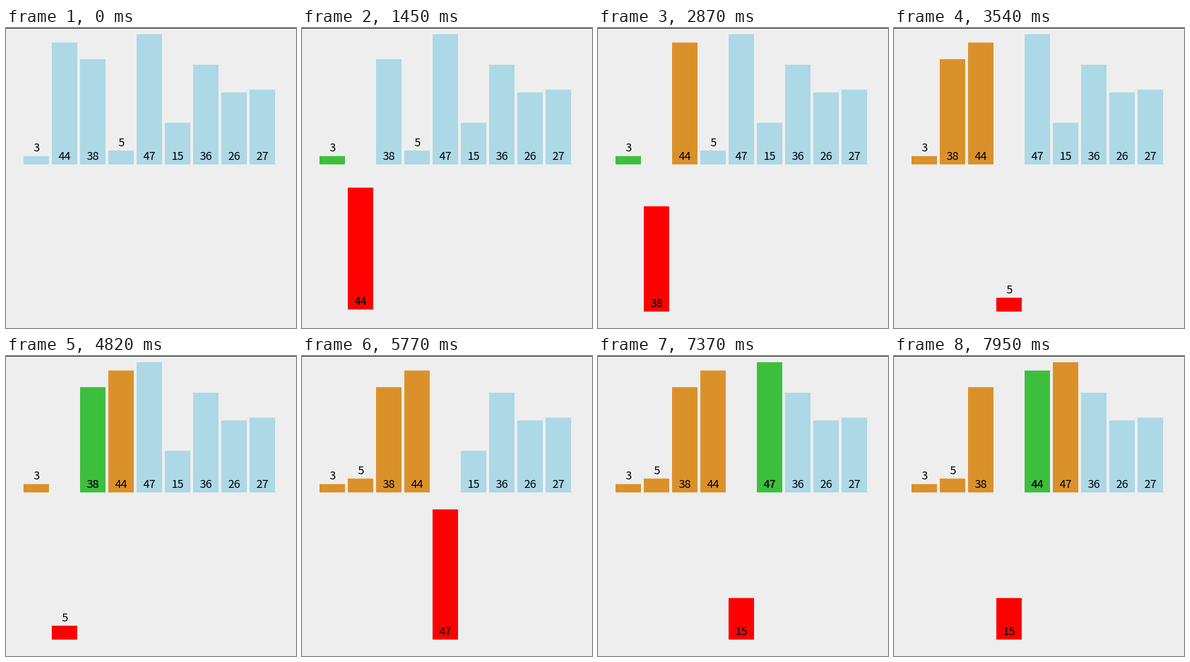
A matplotlib script for the animation above (7990 ms loop, 513 px wide and 530 px high).

```python
import numpy as np
import matplotlib.pyplot as plt
from matplotlib.animation import FuncAnimation
from matplotlib.colors import to_rgb
from matplotlib.patches import Rectangle

W, H, DPI = 513, 530, 64
LOOP, TICK = 7990, 10
VALUES = [3, 44, 38, 5, 47, 15, 36, 26, 27]

LEFT, PITCH, BAR_W = 31, 50, 45
BASE, DROP, UNIT = 241, 260, 230 / 47
PAD = 8            # gap between a label's baseline and the edge under it

IDLE = np.array(to_rgb("#add8e6"))
DONE = np.array(to_rgb("#db912a"))
SEEK = np.array(to_rgb("#3dbf3e"))
KEY = np.array(to_rgb("#ff0000"))

# Insertion sort: (start ms, end ms, steps, {value: (colour, slot, drop)})
EVENTS = [
    (500, 590, 3, {3: (DONE, 0, 0)}),
    (790, 980, 5, {44: (KEY, 1, 1)}),
    (1220, 1220, 1, {3: (SEEK, 0, 0)}),
    (1450, 1660, 6, {3: (DONE, 0, 0), 44: (DONE, 1, 0)}),

    (1750, 1960, 6, {38: (KEY, 2, 1)}),
    (2120, 2240, 4, {44: (SEEK, 1, 0)}),
    (2390, 2610, 6, {44: (SEEK, 2, 0), 38: (KEY, 1, 1)}),
    (2750, 2870, 4, {44: (DONE, 2, 0), 3: (SEEK, 0, 0)}),
    (3030, 3240, 6, {3: (DONE, 0, 0), 38: (DONE, 1, 0)}),

    (3330, 3540, 6, {5: (KEY, 3, 1)}),
    (3720, 3800, 3, {44: (SEEK, 2, 0)}),
    (3990, 4200, 6, {44: (SEEK, 3, 0), 5: (KEY, 2, 1)}),
    (4350, 4470, 4, {44: (DONE, 3, 0), 38: (SEEK, 1, 0)}),
    (4620, 4820, 6, {38: (SEEK, 2, 0), 5: (KEY, 1, 1)}),
    (4990, 5070, 3, {38: (DONE, 2, 0), 3: (SEEK, 0, 0)}),
    (5260, 5470, 6, {3: (DONE, 0, 0), 5: (DONE, 1, 0)}),

    (5560, 5770, 6, {47: (KEY, 4, 1)}),
    (5950, 6030, 3, {44: (SEEK, 3, 0)}),
    (6170, 6380, 6, {44: (DONE, 3, 0), 47: (DONE, 4, 0)}),

    (6500, 6710, 6, {15: (KEY, 5, 1)}),
    (6860, 6950, 3, {47: (SEEK, 4, 0)}),
    (7150, 7370, 6, {47: (SEEK, 5, 0), 15: (KEY, 4, 1)}),
    (7510, 7640, 4, {47: (DONE, 5, 0), 44: (SEEK, 3, 0)}),
    (7790, 7950, 5, {44: (SEEK, 4, 0), 15: (KEY, 3, 1)}),
]


def ease(u):
    return 4 * u ** 3 if u < 0.5 else 1 - 4 * (1 - u) ** 3


def progress(t, start, end, steps):
    """Eased progress, held between evenly spaced steps."""
    if t >= end:
        return 1.0
    k = int((t - start) * (steps - 1) / (end - start))
    return ease((k + 0.9) / (steps - 0.1))


def mix(a, b, p):
    return tuple(x + (y - x) * p for x, y in zip(a, b))


def poses(t):
    state = {v: (IDLE, i, 0) for i, v in enumerate(VALUES)}
    for start, end, steps, targets in EVENTS:
        if t < start:
            break
        p = progress(t, start, end, steps)
        for v, target in targets.items():
            state[v] = mix(state[v], target, p)
    return state


class Bar:
    def __init__(self, ax, value):
        self.height = value * UNIT
        self.inside = self.height > 30
        self.rect = ax.add_patch(
            Rectangle((0, 0), BAR_W, self.height, lw=0, snap=False))
        # the second copy darkens the label while the bar is compared
        self.labels = [
            ax.text(0, 0, str(value), ha="center", va="baseline",
                    color="black", family="Noto Sans CJK JP",
                    size=20 * 72 / DPI)
            for _ in range(2)]

    def place(self, colour, slot, drop):
        x = LEFT + slot * PITCH
        bottom = BASE + drop * DROP
        top = bottom - self.height
        self.rect.set_xy((x, top))
        self.rect.set_facecolor(colour)
        edge = bottom if self.inside else top
        for label in self.labels:
            label.set_position((x + BAR_W / 2, edge - PAD))
        heavy = self.inside and colour[1] > 2 * colour[0]
        self.labels[1].set_visible(heavy)


fig = plt.figure(figsize=(W / DPI, H / DPI), dpi=DPI, facecolor="#eeeeee")
ax = fig.add_axes([0, 0, 1, 1])
ax.set_xlim(0, W)
ax.set_ylim(H, 0)
ax.axis("off")
ax.add_patch(Rectangle((0, 0), W, 1, lw=0, color="black", snap=False))
bars = {v: Bar(ax, v) for v in VALUES}


def draw(i):
    for v, pose in poses(i * TICK).items():
        bars[v].place(*pose)
    return []


anim = FuncAnimation(fig, draw, frames=LOOP // TICK, interval=TICK,
                     repeat=True, repeat_delay=0)
plt.show()
```
